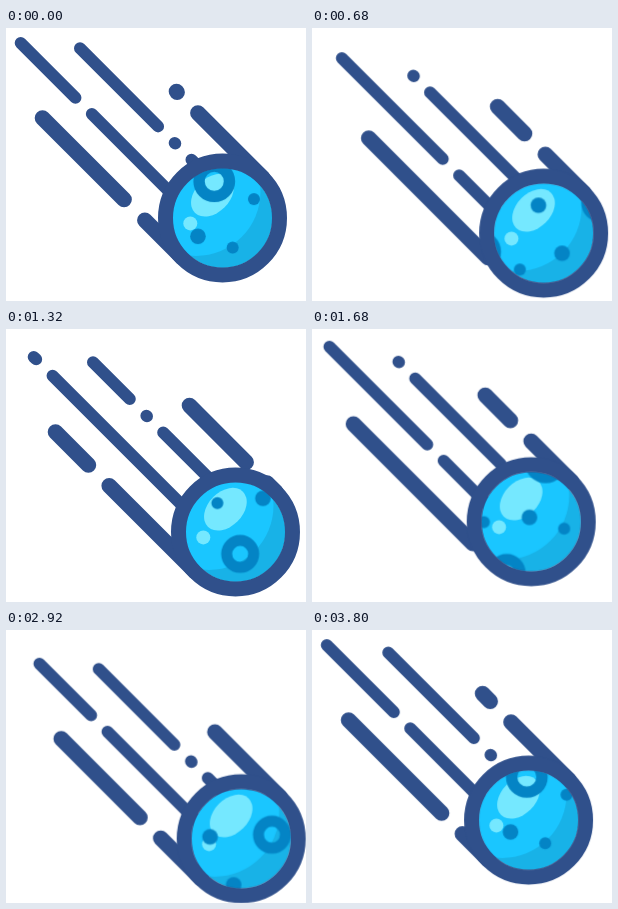
Recreate the animation shown at these times as an HTML page. Size 300 px wide and 273 px high, loop 3840 ms.

```html
<!DOCTYPE html>
<html lang="en">
<head>
<meta charset="utf-8">
<title>Comet</title>
<style>
  html, body { margin: 0; width: 100%; height: 100%; overflow: hidden; background: #fff; }
  svg { display: block; width: 300px; height: 273px; }
  .streak { fill: none; stroke: #30508b; stroke-linecap: round; }
</style>
</head>
<body>
<svg viewBox="0 0 300 273">
  <defs>
    <clipPath id="disc"><circle cx="216.5" cy="190" r="50"/></clipPath>
  </defs>
  <g id="comet">
    <g id="streaks"></g>
    <g clip-path="url(#disc)">
      <circle cx="216.5" cy="190" r="52" fill="#18b2e7"/>
      <circle cx="190" cy="163.5" r="64.5" fill="#1ac6ff"/>
      <ellipse cx="206.4" cy="167.2" rx="24.8" ry="17.2" fill="#75e8ff" transform="rotate(-45 206.4 167.2)"/>
      <circle cx="184.3" cy="195.4" r="7" fill="#75e8ff"/>
      <g id="craters"></g>
    </g>
    <circle cx="216.5" cy="190" r="57" fill="none" stroke="#30508b" stroke-width="15"/>
  </g>
</svg>
<script>
const HALF = 1920;
const STEPS = 49;            // one pattern cycle; the loop restarts one step early
const RUN = STEPS - 1;
const DIAG = Math.SQRT2;
const $ = id => document.getElementById(id);

function add(parent, tag, attrs) {
  const el = document.createElementNS('http://www.w3.org/2000/svg', tag);
  for (const k in attrs) el.setAttribute(k, attrs[k]);
  return parent.appendChild(el);
}

function loop(el, frames, easing = 'linear') {
  el.animate(frames, { duration: HALF, iterations: Infinity, easing: 'linear' })
    .effect.updateTiming({ easing });
}

// Horizontal measures; each streak runs down at 45 degrees.
const streaks = [
  { x: 14.7, y: 14.9, end: 176, width: 12, first: 86, period: 150.7, dash: [134.3, 16.4] },
  { x: 74, y: 20.3, end: 200, width: 12, first: 185.6, period: 119, dash: [85.6, 16.6, 0.6, 16.2] },
  { x: 36.5, y: 90, end: 176.3, width: 15.6, first: 139, period: 140.2, dash: [119.4, 20.8] },
  { x: 170.5, y: 63.6, end: 256.7, width: 15.6, first: 192, period: 85.8, dash: [65, 20.8] }
];

for (const s of streaks) {
  const len = s.end - s.x;
  const path = add($('streaks'), 'path', {
    class: 'streak',
    d: `M${s.x} ${s.y}l${len} ${len}`,
    'stroke-width': s.width,
    'stroke-dasharray': s.dash.map(v => v * DIAG).join(' ')
  });
  const from = (s.x - s.first) * DIAG;
  const to = from + 2 * s.period * DIAG * RUN / STEPS;
  loop(path, [{ strokeDashoffset: from + 'px' }, { strokeDashoffset: to + 'px' }]);
}

// x, y, radius, rim width (0 = solid)
const craters = [
  [208.3, 153.2, 15.2, 11.4], [328.5, 104.6, 13.5, 11],
  [248, 171, 6, 0], [226.7, 219.5, 6, 0], [305.7, 53.8, 6, 0],
  [192, 208.2, 7.8, 0], [290.2, 154.8, 7.8, 0], [266.6, 106.7, 7.8, 0]
];
const wrap = 159.25;

for (const shift of [0, wrap]) {
  for (const [x, y, r, rim] of craters) {
    add($('craters'), 'circle', {
      cx: x + shift, cy: y - shift, r,
      fill: rim ? 'none' : '#0484c5',
      stroke: rim ? '#0484c5' : 'none',
      'stroke-width': rim
    });
  }
}

const roll = wrap * RUN / STEPS;
loop($('craters'), [
  { transform: 'translate(0px, 0px)' },
  { transform: `translate(${-roll}px, ${roll}px)` }
]);

// Sine-like sway along the flight path.
const sine = 'cubic-bezier(.3642, 0, .6358, 1)';
loop($('comet'), [
  { transform: 'translate(0px, 0px)', easing: sine },
  { transform: 'translate(18.8px, 18.8px)', easing: sine },
  { transform: 'translate(0px, 0px)' }
]);
</script>
</body>
</html>
```
